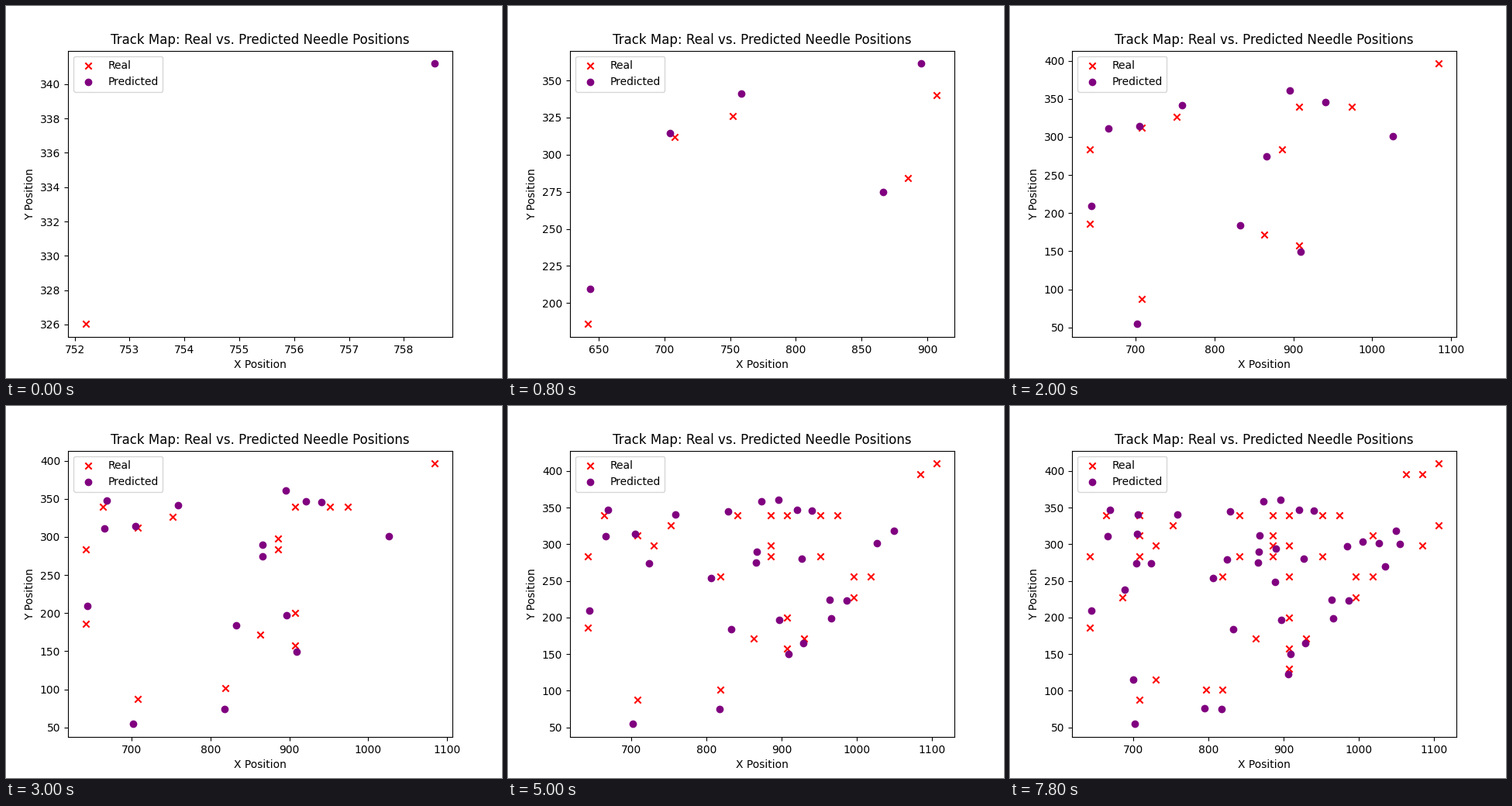
Animation of 640 by 480 pixels, one loop 8000 ms. Source, as a matplotlib script:

```python
import numpy as np
import matplotlib.pyplot as plt
from matplotlib.animation import FuncAnimation

STEP_MS = 200

# Needles sit on a regular grid: (column, row), in order of appearance.
CELLS = np.array([
    (5, 23), (3, 22), (12, 24), (11, 20), (0, 13), (12, 11), (3, 6), (0, 20),
    (15, 24), (20, 28), (10, 12), (8, 7), (12, 14), (1, 24), (11, 21), (14, 24),
    (16, 18), (21, 29), (8, 18), (4, 21), (11, 24), (17, 18), (9, 24), (13, 12),
    (14, 20), (16, 16), (21, 23), (12, 21), (7, 7), (11, 22), (12, 9), (20, 21),
    (2, 16), (19, 28), (3, 24), (17, 22), (3, 20), (4, 8), (12, 18), (9, 20),
])
ORIGIN = np.array([752.1965, 326.019])
PITCH = np.array([22.175, 14.02])

# Prediction error (dx, dy) at a few needles, by position in CELLS.
KEY_ERRORS = {
    0: (6.37, 15.18), 1: (-3.45, 2.3), 2: (-11.8, 21.26), 3: (-19, -9.4),
    4: (2.1, 23.5), 5: (1.5, -8.1), 6: (-6.2, -33.2), 7: (24.5, 27),
    8: (-33.5, 6), 9: (-58, -95), 10: (-30, 12.5), 11: (-1, -27),
    19: (-6.5, -24), 21: (-32, -33), 26: (-52, -26), 37: (-30, -1),
}


def predict(real, power=3):
    """Spread the key errors over all needles by inverse distance."""
    keys = real[list(KEY_ERRORS)]
    errors = np.array(list(KEY_ERRORS.values()))
    dist = np.linalg.norm(real[:, None] - keys[None], axis=2)
    weight = np.maximum(dist, 1e-4) ** -power
    weight /= weight.sum(axis=1, keepdims=True)
    return real + weight @ errors


REAL = ORIGIN + PITCH * (CELLS - CELLS[0])
PREDICTED = predict(REAL)

fig, ax = plt.subplots(figsize=(6.4, 4.8), dpi=100)


def draw(i):
    """Show the first i + 1 pairs; the axes rescale to fit them."""
    ax.clear()
    ax.scatter(*REAL[:i + 1].T, color="red", marker="x", label="Real")
    ax.scatter(*PREDICTED[:i + 1].T, color="purple", marker="o", label="Predicted")
    ax.set_title("Track Map: Real vs. Predicted Needle Positions")
    ax.set_xlabel("X Position")
    ax.set_ylabel("Y Position")
    ax.legend(loc="upper left")
    return []


anim = FuncAnimation(fig, draw, frames=len(REAL), init_func=lambda: draw(0),
                     interval=STEP_MS, repeat=True, repeat_delay=0)
plt.show()
```
